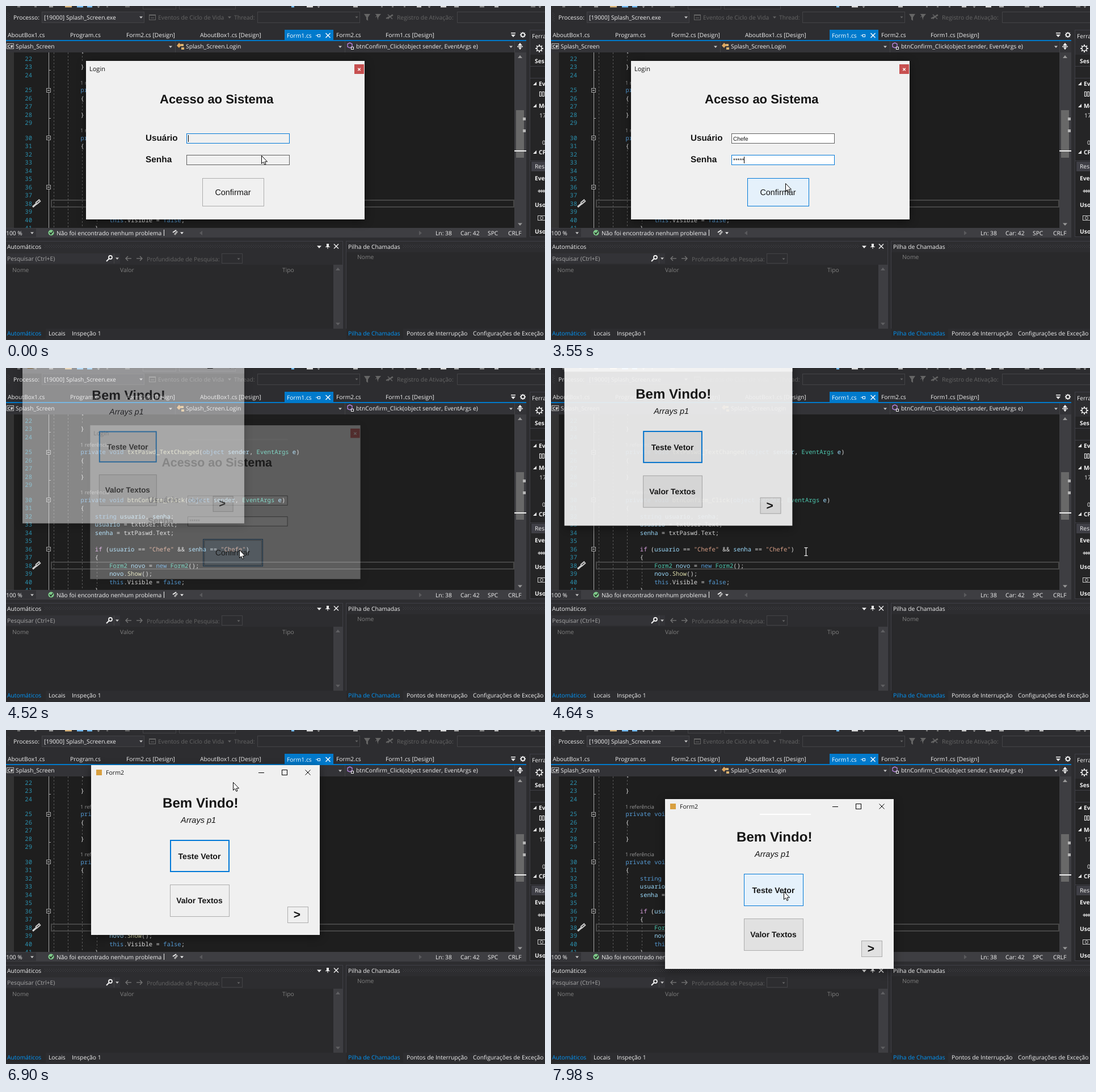
An HTML page with a canvas that plays this animation: 950x590 px, repeating every 8000 ms.

```html
<!DOCTYPE html>
<html lang="pt">
<head>
<meta charset="utf-8">
<title>Login</title>
<style>
html, body { margin: 0; width: 100%; height: 100%; overflow: hidden; background: #2d2d30; }
canvas { display: block; width: 950px; height: 590px; }
</style>
</head>
<body>
<canvas id="stage" width="950" height="590"></canvas>
<script>
const W = 950, H = 590, LOOP = 8000;
const UI = '"Open Sans", sans-serif', SANS = '"Liberation Sans", Arial, sans-serif';
const MONO = '10.55px "Noto Sans Mono", monospace';
const LIGHT = '#f1f1f1', DIM = '#656565', BAR = '#2d2d30', FIELD = '#333337', EDGE = '#434346';
const PANEL = '#29292b', TRACK = '#3e3e42';
const FORM = '#f0f0f0', INK = '#151515', BLUE = '#0078d7';

function surface(canvas) {
  canvas.width = W;
  canvas.height = H;
  const context = canvas.getContext('2d');
  context.textRendering = 'geometricPrecision';
  return context;
}
const stage = surface(document.getElementById('stage'));
const backdrop = surface(document.createElement('canvas'));
const layer = surface(document.createElement('canvas'));
let g = stage;

function drawOn(context, draw) {
  const previous = g;
  g = context;
  draw();
  g = previous;
}
function rect(x, y, w, h, color) {
  g.fillStyle = color;
  g.fillRect(x, y, w, h);
}
function frame(x, y, w, h, color, width = 1) {
  g.strokeStyle = color;
  g.lineWidth = width;
  g.strokeRect(x + width / 2, y + width / 2, w - width, h - width);
}
function box(x, y, w, h, fill, edge, width) {
  rect(x, y, w, h, fill);
  frame(x, y, w, h, edge, width);
}
function write(s, x, base, color, font, align = 'left') {
  g.font = font;
  g.fillStyle = color;
  g.textAlign = align;
  g.fillText(s, x, base);
}
const label = (s, x, mid, color = LIGHT, size = 10.3, weight = '') =>
  write(s, x, mid + 4, color, `${weight} ${size}px ${UI}`);
function poly(points, color, stroke, width = 1) {
  g.beginPath();
  for (let i = 0; i < points.length; i += 2) g.lineTo(points[i], points[i + 1]);
  if (stroke) { g.strokeStyle = color; g.lineWidth = width; g.stroke(); }
  else { g.fillStyle = color; g.fill(); }
}
const line = (x1, y1, x2, y2, color, width) => poly([x1, y1, x2, y2], color, true, width);
const down = (x, y, color = '#c8c8c8', r = 3) => poly([x - r, y - 1.5, x + r, y - 1.5, x, y + r - 1], color);
const up = (x, y, color) => poly([x - 4, y + 2, x + 4, y + 2, x, y - 3], color);
function cross(x, y, r, color, width) {
  line(x - r, y - r, x + r, y + r, color, width);
  line(x - r, y + r, x + r, y - r, color, width);
}
function ring(x, y, r, color, width) {
  g.beginPath();
  g.arc(x, y, r, 0, 7);
  g.strokeStyle = color;
  g.lineWidth = width;
  g.stroke();
}
function disc(x, y, r, color) {
  g.beginPath();
  g.arc(x, y, r, 0, 7);
  g.fillStyle = color;
  g.fill();
}
function gear(x, y, r) {
  for (let a = 0; a < 8; a++) {
    const c = Math.cos(a * Math.PI / 4), s = Math.sin(a * Math.PI / 4);
    line(x + c * r * .6, y + s * r * .6, x + c * r, y + s * r, LIGHT, 1.8);
  }
  ring(x, y, r * .6, LIGHT, 1.5);
}
function grip(x, y, w, rows) {
  for (let j = 0; j < rows; j++)
    for (let i = j % 2 * 2; i < w; i += 4) rect(x + i, y + j * 2, 1, 1, '#46464a');
}
function pin(x, y) {
  rect(x - 2, y - 4, 4, 5, LIGHT);
  rect(x - 4, y + 1, 8, 1, LIGHT);
  rect(x - .5, y + 1, 1, 4, LIGHT);
}

// ---- IDE backdrop -------------------------------------------------------
function toolbars() {
  rect(0, 0, W, H, BAR);
  [[20, 5, '#777'], [50, 4, '#777'], [76, 7, '#999'], [104, 12, '#dcb67a'], [125, 11, '#75bfff'],
   [143, 9, '#75bfff'], [177, 3, '#666'], [210, 8, '#666'], [503, 5, '#75bfff'], [530, 11, '#ddd'],
   [612, 8, '#bbb'], [661, 3, '#777'], [680, 3, '#777'], [701, 3, '#777'], [724, 8, '#ccc'],
   [766, 10, '#ddd'], [790, 8, '#aaa'], [835, 8, '#888'], [861, 7, '#bbb'], [925, 8, '#777']
  ].forEach(([x, w, c]) => rect(x, 0, w, 2.5, c));
  frame(241, -8, 59, 14, EDGE);
  frame(305, -8, 100, 14, EDGE);
  [163, 551, 746, 941].forEach(x => down(x, 2, '#999', 2.5));
  grip(3, 12, 4, 8);
  label('Processo:', 13, 20);
  box(63, 10, 181, 20, FIELD, EDGE);
  label('[19000] Splash_Screen.exe', 67, 20);
  down(238, 20);
  frame(252, 15, 12, 10, DIM);
  rect(252, 15, 12, 2, DIM);
  line(255, 21, 261, 21, DIM);
  label('Eventos de Ciclo de Vida', 268, 20, DIM);
  down(394, 20, DIM);
  label('Thread:', 402, 20, DIM);
  box(443, 10, 181, 20, BAR, EDGE);
  down(618, 20, DIM, 2.5);
  poly([631, 14, 642, 14, 638, 20, 638, 26, 635, 24, 635, 20], DIM);
  poly([652, 14, 661, 14, 656, 20, 656, 25, 654, 20], DIM);
  cross(654, 17, 3, DIM);
  line(670, 22, 682, 16, DIM, 2);
  cross(677, 19, 4, DIM, 1.5);
  label('Registro de Ativação:', 689, 20, DIM);
  box(795, 10, 170, 20, BAR, EDGE);

  [['AboutBox1.cs', 3], ['Program.cs', 113], ['Form2.cs [Design]', 212], ['AboutBox1.cs [Design]', 342],
   ['Form2.cs', 582], ['Form1.cs [Design]', 669]].forEach(([s, x]) => label(s, x, 51));
  rect(491, 42, 86, 19, '#007acc');
  rect(0, 60, 917, 2, '#007acc');
  label('Form1.cs', 495, 52, '#fff');
  line(546, 52, 549, 52, '#fff');
  frame(549, 50, 5, 5, '#fff');
  cross(567.5, 52, 4, '#fff', 1.5);
  rect(890, 47, 8, 1.5, LIGHT);
  down(894, 52, LIGHT, 4);
  gear(911, 51, 5);

  rect(0, 62, 917, 20, FIELD);
  [298, 597, 896].forEach(x => rect(x, 62, 1, 20, EDGE));
  frame(1, 66, 13, 10, '#b8b8b8');
  write('C#', 3, 74, LIGHT, `bold 7.5px ${UI}`);
  label('Splash_Screen', 17, 71);
  poly([301, 70, 305, 65, 309, 69, 305, 74], '#e0a860');
  rect(308, 67, 5, 4, '#d8b070');
  rect(309, 73, 5, 4, '#d8b070');
  label('Splash_Screen.Login', 317, 71);
  poly([606, 65, 610, 67, 610, 72, 606, 74, 602, 72, 602, 67, 606, 65], '#b180d7', true, 1.4);
  frame(608, 72, 5, 5, LIGHT);
  label('btnConfirm_Click(object sender, EventArgs e)', 617, 71);
  [290, 589, 890].forEach(x => down(x, 72));
  rect(901, 71, 10, 1.5, LIGHT);
  line(906, 66, 906, 77, LIGHT);
  up(906, 68, LIGHT);
  down(906, 75, LIGHT);
}

const code = {
  21: [0, '{'], 23: [0, '}'],
  25: [0, 'private void txtPaswd_TextChanged(object sender, EventArgs e)'],
  26: [0, '{'], 28: [0, '}'],
  30: [0, 'private void btnConfirm_Click(object sender, EventArgs e)'],
  31: [0, '{'], 32: [4, 'string usuario, senha;'],
  33: [4, 'usuario = txtUser.Text;'], 34: [4, 'senha = txtPaswd.Text;'],
  36: [4, 'if (usuario == "Chefe" && senha == "Chefe")'], 37: [4, '{'],
  38: [8, 'Form2 novo = new Form2();'], 39: [8, 'novo.Show();'],
  40: [8, 'this.Visible = false;'], 41: [4, '}']
};
function tint(word) {
  if (word[0] === '"') return '#d69d85';
  if (word === 'if') return '#d8a0df';
  if (/^(private|void|object|string|new|this|false)$/.test(word)) return '#569cd6';
  if (/^(Form2|EventArgs)$/.test(word)) return '#4ec9b0';
  if (/^(usuario|senha|novo|sender|e)$/.test(word)) return '#9cdcfe';
  if (/_|^Show$/.test(word)) return '#dcdcaa';
  return '#dcdcdc';
}
const lineY = n => 93 + (n - 22) * 14.5 + (n >= 25) * 12 + (n >= 30) * 12;

function editor() {
  g.save();
  g.beginPath();
  g.rect(0, 82, 917, 310);
  g.clip();
  rect(0, 82, 917, 310, '#1e1e1e');
  rect(0, 82, 14, 310, '#333333');
  frame(79, 342, 817, 14, '#464646', 2);
  g.setLineDash([3, 3]);
  line(84.5, 82, 84.5, 392, '#5a5a5a');
  line(109.5, 82, 109.5, 392, '#5a5a5a');
  [[82, 100], [170, 185], [254, 392]].forEach(([a, b]) => line(134.5, a, 134.5, b, '#5a5a5a'));
  line(160.5, 342, 160.5, 385, '#5a5a5a');
  g.setLineDash([]);
  line(75.5, 82, 75.5, 392, '#a5a5a5');
  [113.5, 198.5].forEach(y => line(75, y, 79, y, '#a5a5a5'));
  [149, 233, 320].forEach(y => {
    box(71, y - 4, 8, 8, '#1e1e1e', '#a5a5a5');
    rect(73, y - .5, 4, 1, LIGHT);
  });
  [135, 219].forEach(y => label('1 referência', 131, y, '#999', 9.2));
  for (let n = 21; n <= 41; n++) {
    const base = Math.round(lineY(n) + 3.6);
    write(n, 46, base, '#2b91af', MONO, 'right');
    if (!code[n]) continue;
    let x = 131.5 + code[n][0] * 6.33;
    for (const word of code[n][1].match(/"[^"]*"|\w+|\W/g)) {
      write(word, x, base, tint(word), MONO);
      x += g.measureText(word).width;
    }
  }
  line(47, 355, 54, 349, '#d0d0d0', 3);
  line(53, 349, 60, 343, '#d0d0d0', 5);
  line(54, 348, 59, 344, '#3a3a3a', 1.5);
  rect(896, 82, 21, 310, TRACK);
  rect(899, 184, 14, 84, '#686868');
  rect(896, 255, 21, 2, LIGHT);
  rect(911, 197, 5, 5, '#b5b5b5');
  rect(911, 218, 5, 5, '#b5b5b5');
  up(906, 90, '#999');
  down(906, 385, '#999', 4);
  g.restore();

  rect(0, 392, 917, 17, TRACK);
  rect(0, 393, 53, 15, FIELD);
  label('100 %', 0, 401);
  down(46, 401);
  disc(79.5, 400.5, 5, '#7fcb8b');
  poly([77, 400, 79, 403, 83, 398], '#1e1e1e', true, 1.4);
  label('Não foi encontrado nenhum problema', 89, 401);
  rect(278, 395, 1, 11, LIGHT);
  line(294, 400, 300, 396, LIGHT, 2);
  line(297, 404, 302, 398, '#aaa', 3);
  down(310, 401, LIGHT);
  poly([346, 397, 346, 405, 341, 401], '#5a5a5d');
  poly([728, 397, 728, 405, 733, 401], '#5a5a5d');
  [['Ln: 38', 757], ['Car: 42', 801], ['SPC', 849], ['CRLF', 885]].forEach(([s, x]) => label(s, x, 401));
}

function diagnostics() {
  rect(917, 42, 6, 367, BAR);
  rect(923, 42, 27, 366, '#252526');
  rect(923, 42, 27, 44, BAR);
  frame(923, 42, 40, 366, '#3f3f46');
  label('Ferra', 927, 53);
  gear(940, 75, 7);
  [106, 127].forEach(y => rect(923, y, 27, 1, '#3f3f46'));
  rect(923, 273, 27, 1, '#3f3f46');
  rect(926, 275, 24, 17, '#3f3f46');
  [['Ses', 932, 97], ['Ev', 939, 137], ['Mem', 939, 176], ['CPU', 939, 258], ['Eve', 932, 304], ['Uso', 932, 351],
   ['Uso', 932, 398]].forEach(([s, x, y]) => label(s, x, y, LIGHT, 10.3, 'bold'));
  [137, 176, 258].forEach(y => poly([929, y + 3, 935, y + 3, 935, y - 3], LIGHT));
  frame(940, 151, 4, 9, LIGHT);
  frame(945, 151, 4, 9, LIGHT);
  label('17', 940, 193);
  label('0', 945, 241);
  label('Res', 932, 283);
  for (let i = 0; i < 4; i++) poly([937 + i * 4, 327, 940 + i * 4, 324, 943 + i * 4, 327, 940 + i * 4, 330], '#aaa');
  frame(937, 370, 14, 9, '#ccc');
  ring(944, 374.5, 2.5, '#ccc', 1);
}

function panels() {
  rect(0, 409, W, 181, BAR);
  rect(0, 415, 593, 1, '#3f3f46');
  rect(600, 415, 350, 1, '#3f3f46');
  grip(68, 422, 476, 3);
  grip(700, 422, 250, 3);
  label('Automáticos', 2, 425);
  down(552, 425, LIGHT, 4);
  pin(567, 424);
  cross(582, 424.5, 4, LIGHT, 1.5);
  rect(0, 457, 593, 113, PANEL);
  rect(0, 437, 201, 18, FIELD);
  label('Pesquisar (Ctrl+E)', 2, 446, '#a8a8a8');
  ring(184, 444, 3, LIGHT, 1.8);
  line(182, 446, 177, 451, LIGHT, 2);
  rect(190, 437, 1, 18, EDGE);
  down(196, 446);
  [[216, 1], [235, -1]].forEach(([x, d]) => {
    line(x - 5, 446, x + 5, 446, '#777', 1.3);
    poly([x - d, 442, x - d * 5, 446, x - d, 450], '#777', true, 1.3);
  });
  label('Profundidade de Pesquisa:', 248, 447, DIM);
  frame(380, 437, 37, 18, EDGE);
  down(410, 447, DIM, 2.5);
  [['Nome', 11], ['Valor', 201], ['Tipo', 487]].forEach(([s, x]) => label(s, x, 466, '#808080'));
  rect(577, 457, 16, 113, TRACK);
  up(585, 465, '#606063');
  down(585, 561, '#606063', 4);
  rect(0, 570, 70, 18, PANEL);
  label('Automáticos', 2, 578, '#0097fb');
  label('Locais', 75, 578);
  label('Inspeção 1', 116, 578);

  label('Pilha de Chamadas', 603, 425);
  rect(600, 435, 350, 135, PANEL);
  label('Nome', 619, 443, '#808080');
  rect(600, 570, 100, 18, PANEL);
  label('Pilha de Chamadas', 603, 578, '#0097fb');
  label('Pontos de Interrupção', 706, 578);
  label('Configurações de Exceção', 823, 578);
  [593, 599].forEach(x => rect(x, 415, 1, 155, '#3f3f46'));
}

// ---- Dialogs ------------------------------------------------------------
function windowBody(x, y, w, h, fill) {
  g.save();
  g.shadowColor = 'rgba(0,0,0,.45)';
  g.shadowBlur = 15;
  g.shadowOffsetY = 3;
  rect(x, y, w, h, fill);
  g.restore();
}
// Draws a whole window as one translucent layer, scaled about its centre.
function zoomed(cx, cy, scale, alpha, draw) {
  layer.clearRect(0, 0, W, H);
  layer.save();
  layer.translate(cx, cy);
  layer.scale(scale, scale);
  layer.translate(-cx, -cy);
  drawOn(layer, draw);
  layer.restore();
  g.globalAlpha = alpha;
  g.drawImage(layer.canvas, 0, 0);
  g.globalAlpha = 1;
}

function loginForm(t, mouse) {
  const pressed = t >= 4220, onPassword = t >= 1730 && !pressed;
  const letters = countPast([120, 830, 980, 1060, 1130], t);
  const stars = countPast([2120, 2370, 2670, 2670, 2820], t);
  const fill = t < 120 ? FORM : '#fff';
  windowBody(141, 97, 491, 280, FORM);
  write('Login', 147, 115, INK, `11px ${UI}`);
  rect(614, 103, 17, 17, '#c75050');
  cross(622.5, 112, 2.2, '#fff', 1.3);
  write('Acesso ao Sistema', 271, 172, INK, `bold 22px ${SANS}`);
  write('Usuário', 246, 238, INK, `bold 15.2px ${SANS}`);
  write('Senha', 246, 276, INK, `bold 15.4px ${SANS}`);
  field(225, 'Chefe'.slice(0, letters), fill, t < 1730);
  field(263, '*'.repeat(stars), fill, onPassword);
  const hover = mouse && mouse.x >= 346 && mouse.x < 455 && mouse.y >= 304 && mouse.y < 354;
  box(346, 304, 109, 50, pressed ? '#cce4f7' : hover ? '#e5f1fb' : FORM,
    pressed ? '#005499' : hover ? BLUE : '#adadad');
  if (pressed) {
    g.setLineDash([1, 1]);
    frame(348, 306, 105, 46, '#222');
    g.setLineDash([]);
    rect(319, 122, 181, 2, '#fff');
  }
  write('Confirmar', 400, 334, INK, `14.4px ${SANS}`, 'center');
}
function field(y, value, fill, focused) {
  box(318, y, 182, 18, fill, focused ? BLUE : '#5f5f5f');
  write(value, 321, y + 12.5, INK, `10px ${SANS}`);
  if (focused) rect(Math.round(321 + g.measureText(value).width), y + 3, 1, 12, '#000');
}

function welcomeForm(x, y, { flat, hover, whiteBar }) {
  const face = flat ? '#efefef' : '#e1e1e1';
  windowBody(x, y, 403, 300, FORM);
  g.save();
  g.translate(x, y);
  if (whiteBar) rect(0, 0, 403, 27, '#fff');
  rect(9, 8, 10, 10, '#d9a040');
  write('Form2', 26, 17, INK, `10.6px ${UI}`);
  rect(295, 13, 10, 1, '#000');
  frame(336, 8, 10, 10, '#000');
  cross(382, 13, 4.5, '#000', 1);
  write('Bem Vindo!', 126, 75, INK, `bold 24.1px ${SANS}`);
  write('Arrays p1', 158, 102, INK, `italic 14.5px ${SANS}`);
  box(139, 132, 105, 57, hover ? '#e5f1fb' : face, BLUE, hover ? 1 : 2);
  box(139, 211, 105, 57, face, '#adadad');
  box(346, 250, 37, 29, face, '#adadad');
  write('Teste Vetor', 191, 166, INK, `bold 14.1px ${SANS}`, 'center');
  write('Valor Textos', 191, 244, INK, `bold 13.9px ${SANS}`, 'center');
  write('>', 363, 271, INK, `bold 21px ${SANS}`, 'center');
  g.restore();
}

// ---- Timing -------------------------------------------------------------
const countPast = (times, t) => times.filter(s => s <= t).length;
const ticks = [0, 120, 370, 830, 980, 1130, 1730, 1860, 1990, 2120, 2370, 2670, 2820,
  3260, 3400, 3530, 3670, 3810, 3950, 4080, 4220, 4370, 4500, 4640, 4790, 4910, 5030, 5160, 5280, 5400,
  5550, 5820, 5970, 6110, 6240, 6370, 6490, 6620, 6900, 7020, 7170, 7440, 7580, 7720, 7850, 7980];
// time, x, y of the pointer tip
const route = [[3260, 449, 269], [3530, 413, 313], [3810, 384, 327], [4080, 379, 325], [4370, 379, 325],
  [4640, 445, 317], [4910, 440, 220], [5160, 375, 70], [5400, 340, 5], [5550, 339, 3], [5820, 342, 6], [5970, 345, 8],
  [6490, 276, 9], [6620, 273, 8], [6900, 400, 92], [7020, 453, 146], [7170, 451, 152], [7440, 449, 161],
  [7720, 425, 245], [7980, 410, 285]];

function pointerAt(t) {
  if (t < 120) return { x: 450, y: 264 };
  if (t < route[0][0]) return null;
  const i = Math.min(countPast(route.map(p => p[0]), t), route.length - 1);
  const [t0, x0, y0] = route[i - 1], [t1, x1, y1] = route[i];
  const k = Math.min(1, (t - t0) / (t1 - t0));
  return { x: x0 + (x1 - x0) * k, y: y0 + (y1 - y0) * k };
}
function pointer({ x, y }, beam) {
  g.save();
  g.translate(Math.round(x) + .5, Math.round(y) + .5);
  if (beam) {
    line(4, 0, 4, 14, LIGHT, 1.2);
    [0, 14].forEach(v => line(1, v, 7, v, LIGHT, 1.2));
  } else {
    const arrow = [0, 0, 0, 14, 3, 11, 5.5, 16, 7.5, 15, 5.5, 10.5, 10, 10.5, 0, 0];
    poly(arrow, '#fff');
    poly(arrow, '#000', true);
  }
  g.restore();
}

// The welcome window rests half off-screen, follows the drag, then stays put.
function welcomeOrigin(t, mouse) {
  if (t < 6900) return [23, -21];
  if (t < 7170) return [Math.round(mouse.x - 250), Math.round(mouse.y - 30)];
  return [201, 122];
}

function render(now) {
  const t = now % LOOP;
  const tick = ticks[countPast(ticks, t) - 1];
  const mouse = pointerAt(tick);
  g.drawImage(backdrop.canvas, 0, 0);
  if (tick < 4500) loginForm(tick, mouse);
  else if (tick < 4640) zoomed(386, 237, .97, .3, () => loginForm(tick, mouse));

  if (tick >= 4500) {
    const [x, y] = welcomeOrigin(tick, mouse);
    const look = { flat: tick >= 6900 && tick < 7170, hover: tick >= 7850, whiteBar: tick < 4790 };
    const draw = () => welcomeForm(x, y, look);
    if (tick < 4640) zoomed(224, 128, .97, .5, draw);
    else if (tick < 4790) zoomed(224, 128, .997, .94, draw);
    else draw();
    if (tick >= 5820 && tick < 6900) {
      const left = tick < 6240 ? 296 : 269;
      poly([left, 6, left + 6, 0, 356, 0, 356, 6], '#fff');
    }
    if (tick >= 7440) rect(368, 148, 90, 2, '#fff');
  }
  if (mouse) pointer(mouse, tick >= 4640 && tick < 5030);
}

drawOn(backdrop, () => [toolbars, editor, diagnostics, panels].forEach(draw => draw()));

let start;
function loop(now) {
  start ??= now;
  render(Math.max(0, now - start));
  requestAnimationFrame(loop);
}
requestAnimationFrame(loop);
</script>
</body>
</html>
```
